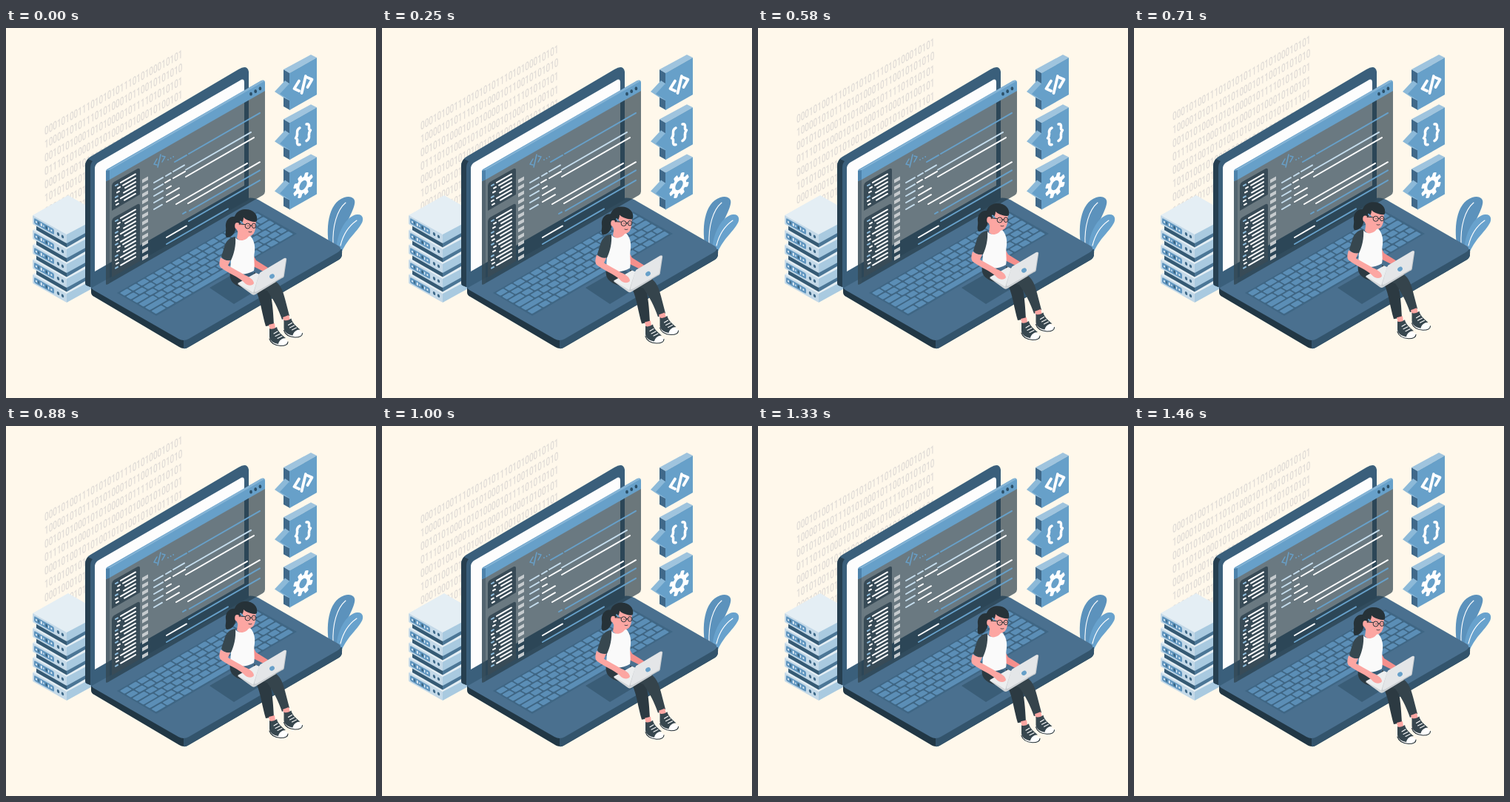
An HTML page for the animation above (1500 ms loop, 500 by 500 pixels).

```html
<!DOCTYPE html>
<html lang="en">
<head>
<meta charset="utf-8">
<title>Coding scene</title>
<style>
html, body { margin: 0; width: 100%; height: 100%; overflow: hidden; background: #fff8eb; }
svg { display: block; width: 100vw; height: 100vh; }
text { font: 500 15.5px Roboto, Arial, sans-serif; fill: #e0dcd7; }
.line { fill: none; stroke-linecap: round; stroke-linejoin: round; }
</style>
</head>
<body>
<svg viewBox="0 0 500 500">
  <g id="bits"></g>
  <g id="servers"></g>

  <g id="plant">
    <path fill="#5c92bc" d="M438 302C431 272 435 236 457 229C467 226 473 231 471 238C468 252 455 268 448 302Z"/>
    <path fill="#68a2cd" d="M446 302C447 276 460 254 474 252C483 251 484 259 480 265C473 277 463 283 454 302Z"/>
    <path class="line" stroke="#fff" stroke-width="1.1" d="M442 293C441 268 447 246 459 236M452 294C456 277 464 267 474 260"/>
  </g>

  <g id="base">
    <path fill="#213745" d="M115 350V357Q115 361 119 363L234 431Q240 435 247 431L450 313Q455 310 454 299L240 400Z"/>
    <path fill="#33546c" d="M240 422L447 302Q454 298 454 299V307Q454 310 450 313L247 431Q243 434 240 433Z"/>
    <path fill="#4a708f" d="M115 350L326 230Q335 228 346 235L446 292.500Q458 298 447 304L247 420Q240 424 233 420L118 354Q115 352 115 350Z"/>
    <path fill="#3a5d77" d="M275 351L322 324L356 344L308 373Z"/>
    <path fill="#3f6684" d="M150 358L340 248L393 278L203 389Z"/>
    <g id="keys"></g>
  </g>

  <g id="lid">
    <path fill="#3a5f7b" d="M107 187Q107 178 114 174L314 56Q326 49 328 59V232L116 351L109 348Q107 347 107 344Z"/>
    <path fill="#263f50" d="M107 187Q107 181 111 177L117 180Q114 183 114 189V350L109 348Q107 347 107 344Z"/>
    <path fill="#fdfdfd" d="M120 190Q120 185 124 182L316 71Q322 67 322 74V213L120 329Z"/>
  </g>

  <g id="panel">
    <path fill="#263b47" opacity=".68" d="M135 205L350 82V221Q350 224 347 226L138 346Q135 348 135 345Z"/>
    <path fill="#3d5261" opacity=".5" d="M135 206L140 204V345L135 347Z"/>
    <path fill="#67a0c9" d="M135 194Q135 191 138 190L345 71Q350 69 350 74V85L140 205L135 207Z"/>
    <path fill="#85b4d6" d="M135 193L345 71Q348 70 349 72L140 192Z"/>
    <path fill="#4d82ab" d="M135 193L140 192V205L135 207Z"/>
    <g fill="#2c5069">
      <ellipse cx="331" cy="89" rx="1.9" ry="2.5"/>
      <ellipse cx="337.2" cy="85.4" rx="1.9" ry="2.5"/>
      <ellipse cx="343.4" cy="81.8" rx="1.9" ry="2.5"/>
    </g>
    <path fill="#384b57" d="M143 213Q143 210 146 208L178 190Q181 189 181 192V225L143 247Z"/>
    <path fill="#384b57" d="M143 261Q143 258 146 256L178 238Q181 237 181 240V315L143 337Z"/>
    <path class="line" stroke="#67a0c9" stroke-width="1.500" d="M204 177L200 184L204 185M209 171L205 188M211 173L215 174L211 181"/>
    <g id="code"></g>
  </g>

  <g id="tags"></g>

  <g id="girl">
    <!-- legs -->
    <path fill="#2c3a42" d="M303 329C301 340 306 346 316 350L339 358C344 369 346 386 351 403L362 401C361 383 360 365 355 350Z"/>
    <path fill="#35444c" d="M335 330L362 341C370 345 374 354 377 366L383 389L373 394C368 379 361 366 353 355L335 350Z"/>
    <path fill="#fca6a2" d="M355 401L363 399L364 406L357 408ZM374 391L382 388L384 395L376 397Z"/>
    <g id="shoe">
      <path fill="#fff" d="M356 418C356 425 362 429 369 430C377 430 382 428 381 423L371 417Z"/>
      <path fill="#37474f" d="M356 406C359 408 363 406 366 404C367 410 373 415 378 419C373 419 369 422 368 427C361 426 356 422 356 417Z"/>
      <path class="line" stroke="#fff" stroke-width="1.100" d="M362 413L367 410M364 416.500L370 413.500M367 419.500L373 416.500"/>
      <path class="line" stroke="#263238" stroke-width="1.100" d="M356 420C358 427 365 429 371 429.500C377 429.500 381 428 381 424"/>
    </g>
    <use href="#shoe" x="19.500" y="-11.500"/>
    <!-- far arm -->
    <path fill="#f58f8c" d="M333 305L338 314L354 324L350 330L334 322Z"/>
    <!-- torso -->
    <path fill="#fca6a2" d="M314 271L330 277L329 287Q321 293 312 284Z"/>
    <path fill="#fafafa" d="M309 282C314 290 325 288 329 280C335 285 337 294 336 302C334 312 337 320 335 328C324 335 309 334 303 327L305 300Z"/>
    <path fill="#37474f" d="M310 282C302 283 297 288 295 296L291 309C294 314 300 315 304 314C308 306 311 294 310 282Z"/>
    <!-- small computer -->
    <path fill="#d3d6d8" d="M313 346L338 332L365 343L337 360Q334 362 331 359Z"/>
    <path fill="#eceeef" d="M313 345L338 331L363 342L335 358Z"/>
    <path fill="#fca6a2" d="M290 310C288 317 287 322 292 325C302 332 313 336 321 343C326 349 333 349 335 345C335 340 328 336 323 334C315 329 307 325 300 321L303 314Q296 315 290 310Z"/>
    <path fill="#c7cbce" d="M342 333Q343 330 346 329L376 311Q380 310 379 314L376 334Q376 337 373 338L340 357Q336 360 334 358Z"/>
    <path fill="#e4e6e8" d="M342 333Q343 330 346 329L375 312Q379 310 378 314L375 333Q375 336 372 337L339 356Q335 358 336 354Z"/>
    <ellipse cx="359.500" cy="335.500" rx="3.600" ry="2.900" fill="#67a0c9" transform="rotate(-35 359.500 335.500)"/>
    <!-- head -->
    <path fill="#263238" d="M312 255C302 253 296 260 297 269C298 275 295 278 298 283C306 283 311 276 311 266Z"/>
    <path fill="#fca6a2" d="M312 258C310 266 311 276 317 279C323 284 333 282 335 277C338 272 338 263 337 256L322 251Z"/>
    <path fill="#263238" d="M309 265C306 253 313 245 324 245C334 245 341 252 339 261L337 262C333 262 325 260 321 256C321 262 318 264 316 265L314 269Z"/>
    <ellipse cx="312.500" cy="267.500" rx="3.300" ry="4.400" fill="#fca6a2"/>
    <path class="line" stroke="#67a0c9" stroke-width="1.900" d="M317 261.500L320 264.500"/>
    <g class="line" stroke="#263238">
      <path d="M315 265L323 265.500M330 267L332 267M327 267.500H327.400M335 267.200H335.300"/>
      <ellipse cx="326.700" cy="267.500" rx="3.600" ry="3.500"/>
      <ellipse cx="335" cy="267.200" rx="2.700" ry="3.300"/>
      <path stroke-width=".8" d="M328 275.500Q330 276.500 332 275.500"/>
    </g>
  </g>
</svg>
<script>
const $ = id => document.getElementById(id);
const fill = (id, parts) => { $(id).innerHTML = parts.join(''); };
const range = (n, fn) => Array.from({ length: n }, (_, i) => fn(i));
const poly = (color, pts) => `<polygon fill="${color}" points="${pts}"/>`;
const SLOPE = 0.575;

const ROWS = [
  '000101001110101010111010100010101',
  '100001010111010100010110010101010',
  '001010100010101000010111101010101',
  '011101010001010100010100010100101',
  '000101001010100101010010101011101',
  '101010010100010010101010100101010',
  '000100010101001010100010101010010',
  '101001010100101010010100101010010'
];
fill('bits', ROWS.map((s, i) =>
  `<text transform="matrix(.642 -.363 0 1 52 ${145 + i * 18.2})">${s}</text>`));

function server(i) {
  const y = 333 - i * 20;
  const face = `<g transform="matrix(1 .565 0 1 36 ${y})">
    <rect width="46" height="12" rx="1" fill="#c4d9e8"/>
    <rect x="2" y="2.500" width="27" height="7.500" rx="2" fill="#5f95bf"/>
    ${range(7, k => `<rect x="${4 + k * 3.4}" y="${k % 3 ? 4.2 : 5.2}" width="${k % 2 ? 1.2 : 1.9}" height="${k % 3 ? 4 : 2.4}" rx=".6" fill="${k % 3 == 1 ? '#315873' : '#e8f1f7'}"/>`).join('')}
    <ellipse cx="34.500" cy="6" rx="1.700" ry="2.200" fill="#3f6a8a"/>
    <ellipse cx="40.500" cy="6" rx="1.700" ry="2.200" fill="#3f6a8a"/>
  </g>`;
  const gap = i < 4
    ? poly('#355a74', `41,${y - 8} 82,${y + 14} 82,${y + 23.5} 41,${y}`) +
      poly('#4b7696', `82,${y + 14} 126,${y - 10} 126,${y - 2} 82,${y + 23.5}`)
    : '';
  return poly('#e4eef4', `36,${y} 84,${y - 27} 131,${y} 82,${y + 26}`) +
    poly('#a9cae0', `82,${y + 26} 131,${y} 131,${y + 11} 82,${y + 38}`) + face + gap;
}
fill('servers', range(5, server));

// Keyboard grid: x runs along the rows, y towards the user.
function key(row, x, w) {
  return `<rect x="${x + 0.07}" y="${row + 0.1}" width="${w - 0.15}" height=".78" rx=".12"/>`;
}
function keyRow(row) {
  const lead = [1, 1, 1.5, 1.8, 2.2, 1.3][row];
  const wide = row == 5 ? 5 : 1;
  const out = [key(row, 0, lead)];
  let x = lead;
  for (let n = 0; x < 15.9; n++) {
    let w = n == 3 ? wide : 1;
    if (16 - x - w < 0.7) w = 16 - x;
    out.push(key(row, x, w));
    x += w;
  }
  return out.join('');
}
$('keys').innerHTML = `<g fill="#5b8eb6" transform="matrix(11.700 -6.800 8.500 4.900 152 358)">${range(6, keyRow).join('')}</g>`;

const bar = (x, y, x2, color = '#fff', w = 2) =>
  `<path class="line" stroke="${color}" stroke-width="${w}" d="M${x} ${y}L${x2} ${y - (x2 - x) * SLOPE}"/>`;

// A sidebar list with small marks and lines of changing length.
function list(y, n) {
  return range(n, i => {
    const v = y + i * 5.3;
    const indent = [0, 3, 6, 4, 0, 5][i % 6];
    return bar(148 + indent % 4, v - indent % 4 * SLOPE, 151 + indent % 4, i % 3 ? '#fff' : '#8fbddd', 2) +
      bar(155 + indent, v - (7 + indent) * SLOPE, 175, '#fff', 2);
  }).join('');
}
const BLUE = '#67a0c9', PALE = '#c4dcec';
const CODE = [
  [247, 170, 343, BLUE], [228, 181, 244, BLUE],
  [243, 191.5, 331, PALE], [243, 201, 335],
  [230, 238, 326], [246, 237, 343],
  [248, 247, 343, BLUE], [239, 251, 243, BLUE], [247, 261, 343, BLUE],
  [217, 283, 244], [217, 292, 300, BLUE],
  [200, 209, 212, PALE], [216, 200, 223, PALE], [226, 194, 241, PALE],
  [200, 218, 212, PALE], [215, 209, 222], [226, 203, 242],
  [200, 227, 212, PALE], [217, 217, 223], [217, 226, 234],
  [200, 236, 212, PALE], [217, 235, 234],
  [200, 245, 211, PALE]
];
fill('code', [
  list(213, 6), list(261, 13),
  ...range(12, i => {
    const y = 205 + i * 9.5;
    return poly('#c6cbce', `184,${y} 192,${y - 4.6} 192,${y + 0.2} 184,${y + 4.8}`);
  }),
  ...range(3, i => `<circle cx="${219 + i * 3.6}" cy="${178 - i * 2}" r=".9" fill="${BLUE}"/>`),
  ...CODE.map(c => bar(...c))
]);

const stroke = (d, w) => `<path class="line" stroke="#fff" stroke-width="${w}" d="${d}"/>`;
const gear = `<g transform="matrix(.87 -.5 0 1 401.500 212.500)">
  ${range(8, i => `<rect x="-3" y="-15.500" width="6" height="7" rx="1.500" fill="#fff" transform="rotate(${i * 45 + 22.5})"/>`).join('')}
  <circle r="8.500" fill="none" stroke="#fff" stroke-width="5"/></g>`;
const ICONS = [
  stroke('M396 71.500L389.500 82L396 85M405 65L399.500 88M407.500 67L413.500 69.500L407.500 80', 3.8),
  stroke('M397 135Q393 137 393.500 142Q394 146 391.500 149Q394 149 393.500 153Q393 159 397 157.500M406 130Q410 129 409.500 134Q409 138 411.500 138Q409 141 409.500 146Q410 150 406 152.500', 3.5),
  gear
];
fill('tags', ICONS.map((icon, i) => `<g transform="translate(0 ${i * 67.3})">
  ${poly('#40698a', '375,56 384,61 384,111 375,106')}
  ${poly('#8cb9d8', '363,86 377,71 383,75 383,98 375,94')}
  ${poly('#67a0c9', '370,89 384,74 384,98')}
  ${poly('#9fc4de', '375,56 412,36 420,40 383,61')}
  ${poly('#67a0c9', '383,61 420,40 420,90 383,111')}
  </g>${icon}`));

// 24 steps a second; the first and last step of the loop share one pose.
const LOOP = 1500, STEP = 1000 / 24, LAST = 35;
const start = performance.now();
function draw(now) {
  const t = Math.max(0, now - start) % LOOP;
  const step = Math.min(LAST, Math.floor(t / STEP + 0.15));
  const rise = 1 - Math.abs(1 - 2 * step / LAST);
  $('bits').setAttribute('transform', `translate(0 ${-20 * rise})`);
  $('girl').setAttribute('transform', `translate(0 ${-10 * rise})`);
  requestAnimationFrame(draw);
}
draw(start);
</script>
</body>
</html>
```
